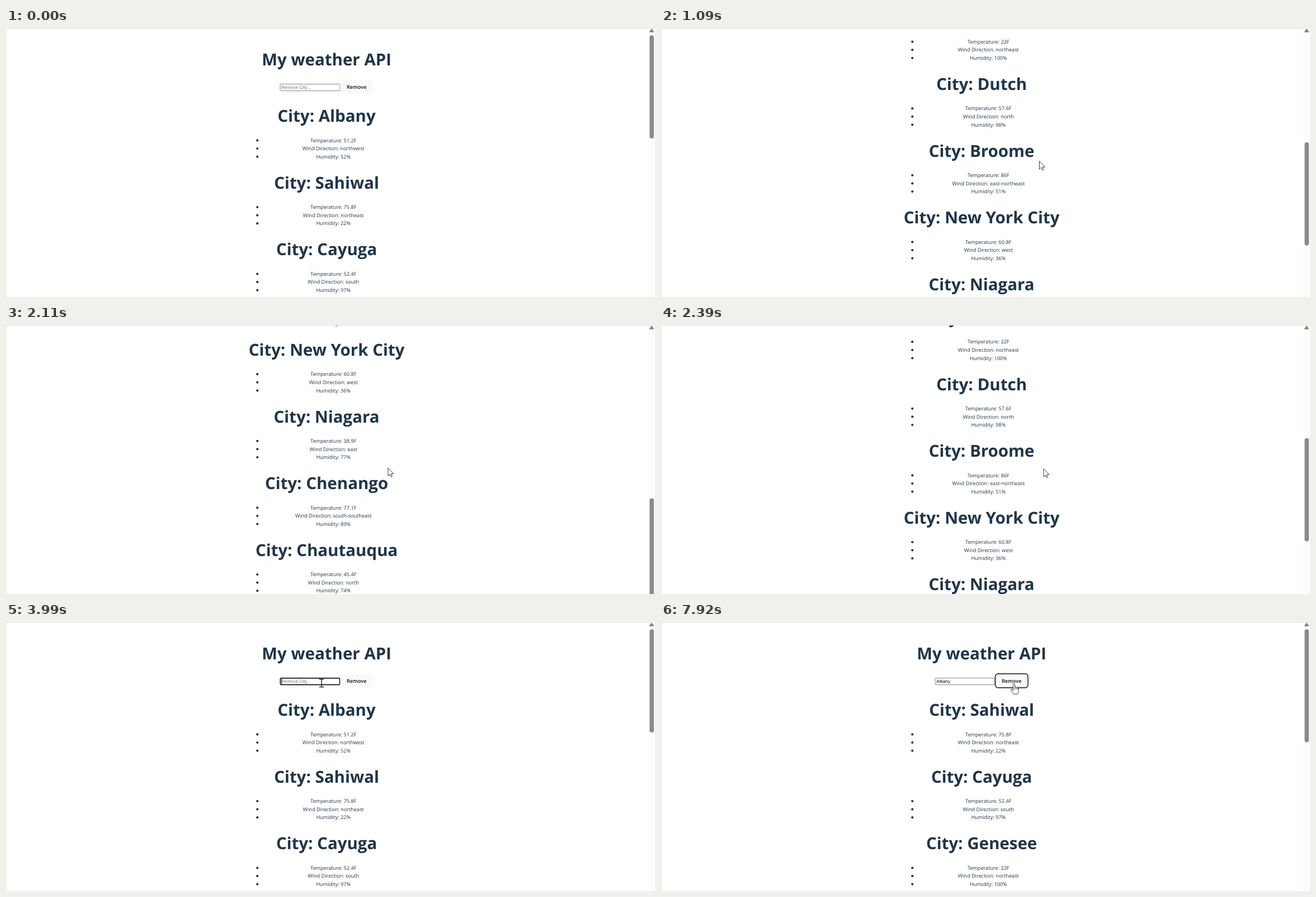
Write an HTML page that moves like this. It is 1162 px wide and 482 px high and loops after 8 s.

```html
<!DOCTYPE html>
<html lang="en">
<head>
<meta charset="utf-8">
<title>My weather API</title>
<style>
  html, body { margin: 0; width: 100%; height: 100%; overflow: hidden; background: #fff; }
  svg { display: block; width: 1162px; height: 482px; }
  text { font-family: "Open Sans", "Noto Sans", sans-serif; fill: #213547; text-rendering: geometricPrecision; white-space: pre; }
  .title { font-size: 29.5px; font-weight: 700; text-anchor: middle; }
  .item { font-size: 9.15px; font-weight: 500; text-anchor: middle; }
  .button { font-size: 9.2px; font-weight: 600; text-anchor: middle; fill: #111; }
  .field { font-family: "Liberation Sans", Arial, sans-serif; font-size: 8.1px; }
</style>
</head>
<body>
<svg viewBox="0 0 1162 482">
  <g id="page">
    <text class="title" x="574" y="67">My weather API</text>
    <rect id="input" fill="#fff"/>
    <text id="value" class="field" x="493" y="109.3"></text>
    <rect id="caret" y="102" width="1" height="9" fill="#000"/>
    <rect id="button" x="598.5" y="92.7" width="58.6" height="25" rx="5" fill="#f9f9f9"/>
    <text class="button" x="627.7" y="109.3">Remove</text>
    <g id="cities"></g>
  </g>
  <rect x="1149" width="13" height="482" fill="#fcfcfc"/>
  <path d="M1156 2.2 L1159.4 7 H1152.6 Z" fill="#858585" stroke="#858585" stroke-width="1.4" stroke-linejoin="round"/>
  <rect id="thumb" x="1152.3" width="7.8" rx="3.9" fill="#8b8b8b"/>
  <path d="M0 .5 H1162" stroke="#dedfe0"/>
  <path d="M.5 1 V482" stroke="#e6e7e8"/>
  <g id="pointer" stroke-linejoin="round" stroke-linecap="round">
    <path id="arrow" d="M.5 .5 V14.4 L3.7 11.4 L5.8 16.2 L8 15.2 L6 10.5 H10.2 Z" fill="#fff" stroke="#222" stroke-width=".9"/>
    <path id="beam" d="M-3.5 -7 H-1 L0 -6.3 L1 -7 H3.5 M0 -6.3 V6.3 M-3.5 7 H-1 L0 6.3 L1 7 H3.5" fill="none" stroke="#111" stroke-width="1.3"/>
    <path id="hand" d="M-1.5 1 Q0 -.9 1.5 1 V6 Q3 5 4.2 6.5 Q5.7 5.7 6.5 7.2 Q8 7 8.2 9 V13 Q8 16 6 18.6 H-.5 Q-2 16 -4.8 12.5 Q-6.6 10.3 -5 9.7 Q-3.5 9.4 -1.5 11.6 Z M1.5 6 V9.5 M4.2 6.8 V9.6 M6.5 7.5 V10" fill="#fff" stroke="#222" stroke-width=".9"/>
  </g>
</svg>
<script>
const LOOP = 8000, STEP = 119.6, LINE = 14.6;
const REMOVED_AT = 7850, FOCUS_AT = 3920, PRESS_AT = 7780;

const cities = [
  ["Albany", "51.2F", "northwest", 52],
  ["Sahiwal", "75.8F", "northeast", 22],
  ["Cayuga", "52.4F", "south", 97],
  ["Genesee", "22F", "northeast", 100],
  ["Dutch", "57.6F", "north", 98],
  ["Broome", "86F", "east-northeast", 51],
  ["New York City", "60.8F", "west", 36],
  ["Niagara", "38.9F", "east", 77],
  ["Chenango", "77.1F", "south-southeast", 89],
  ["Chautauqua", "45.4F", "north", 74]
];

// Each row: time, value(s)
const scrollKeys = [[110, 0], [250, 40], [600, 200], [880, 360], [1090, 535.6], [1300, 585],
  [1500, 585], [1850, 745], [2110, 830.8], [2180, 830.8], [2320, 670], [2460, 390],
  [2600, 150], [2740, 25.6], [2880, 0]];
const pointerKeys = [[120, 672, 232], [1090, 677, 238.5], [2110, 683.5, 256], [2740, 686, 259.5],
  [3080, 681, 240], [3300, 646, 195], [3550, 580, 122], [3720, 565, 109.5], [7000, 565, 109.5],
  [7220, 612, 98], [7400, 658, 86], [7600, 640, 106], [7780, 632, 110.6]];
const typing = [[4980, "A"], [5180, "l"], [5450, "b"], [5580, "a"], [5710, "n"], [6170, "y"]];
const caretSpans = [[FOCUS_AT, 4450], [4950, 6700], [7200, 7700]];

const $ = id => document.getElementById(id);
const set = (el, attrs) => { for (const k in attrs) el.setAttribute(k, attrs[k]); return el; };
const show = (el, on) => set(el, { visibility: on ? "visible" : "hidden" });
const add = (parent, tag, attrs, text = "") => {
  const el = set(document.createElementNS("http://www.w3.org/2000/svg", tag), attrs);
  el.textContent = text;
  return parent.appendChild(el);
};

const cityNodes = cities.map(([name, temperature, wind, humidity], i) => {
  const g = add($("cities"), "g", { transform: `translate(0 ${i * STEP})` });
  add(g, "text", { class: "title", x: 574, y: 168.3 }, "City: " + name);
  [`Temperature: ${temperature}`, `Wind Direction: ${wind}`, `Humidity: ${humidity}%`].forEach((line, n) => {
    add(g, "circle", { cx: 450, cy: 201.4 + n * LINE, r: 2.1, fill: "#213547" });
    add(g, "text", { class: "item", x: 586.2, y: 204.6 + n * LINE }, line);
  });
  return g;
});

function sample(keys, t) {
  const next = keys.findIndex(k => k[0] > t);
  if (next === 0) return keys[0].slice(1);
  if (next < 0) return keys[keys.length - 1].slice(1);
  const a = keys[next - 1], b = keys[next], f = (t - a[0]) / (b[0] - a[0]);
  return a.slice(1).map((v, i) => v + (b[i + 1] - v) * f);
}

function stepped(t) {
  const phase = t < 1400 ? 40 : 10;
  return Math.floor((t - phase) / 70) * 70 + phase;
}

const inside = (x, y, left, top, right, bottom) => x >= left && x <= right && y >= top && y <= bottom;

function drawForm(t, overButton) {
  const focused = t >= FOCUS_AT && t < PRESS_AT;
  set($("input"), focused
    ? { x: 491.2, y: 100.6, width: 106.4, height: 11.8, rx: 1.6, stroke: "#101010", "stroke-width": 1.6 }
    : { x: 490.9, y: 100.5, width: 107, height: 12, rx: 1.4, stroke: "#767676", "stroke-width": 0.9 });

  const typed = typing.filter(k => t >= k[0]).map(k => k[1]).join("");
  const value = $("value");
  value.textContent = typed || "Remove City...";
  value.style.fill = typed ? "#000" : "#757575";
  show($("caret"), caretSpans.some(([on, off]) => t >= on && t < off));
  set($("caret"), { x: typed ? 492.6 + value.getComputedTextLength() : 493 });

  const pressed = t >= PRESS_AT;
  set($("button"), {
    stroke: pressed ? "#101010" : overButton ? "#646cff" : "none",
    "stroke-width": pressed ? 1.4 : 0.6
  });
}

function draw(t) {
  const time = stepped(t);
  const [scroll] = sample(scrollKeys, time);
  const [x, y] = sample(pointerKeys, time);
  const removed = t >= REMOVED_AT;

  set($("page"), { transform: `translate(0 ${-scroll})` });
  set($("cities"), { transform: `translate(0 ${removed ? -STEP : 0})` });
  show(cityNodes[0], !removed);
  set($("thumb"), { y: 13 + scroll * 0.358, height: removed ? 202.5 : 185 });

  const still = scroll === 0;
  const overInput = still && inside(x, y, 490, 100, 598, 113);
  const overButton = still && inside(x, y, 598, 92, 657, 118);
  drawForm(t, overButton);

  set($("pointer"), { transform: `translate(${x} ${y})`, display: t < 120 ? "none" : "inline" });
  show($("beam"), overInput);
  show($("hand"), overButton);
  show($("arrow"), !overInput && !overButton);
}

const start = performance.now();
function tick() {
  draw((performance.now() - start) % LOOP);
  requestAnimationFrame(tick);
}
tick();
</script>
</body>
</html>
```
